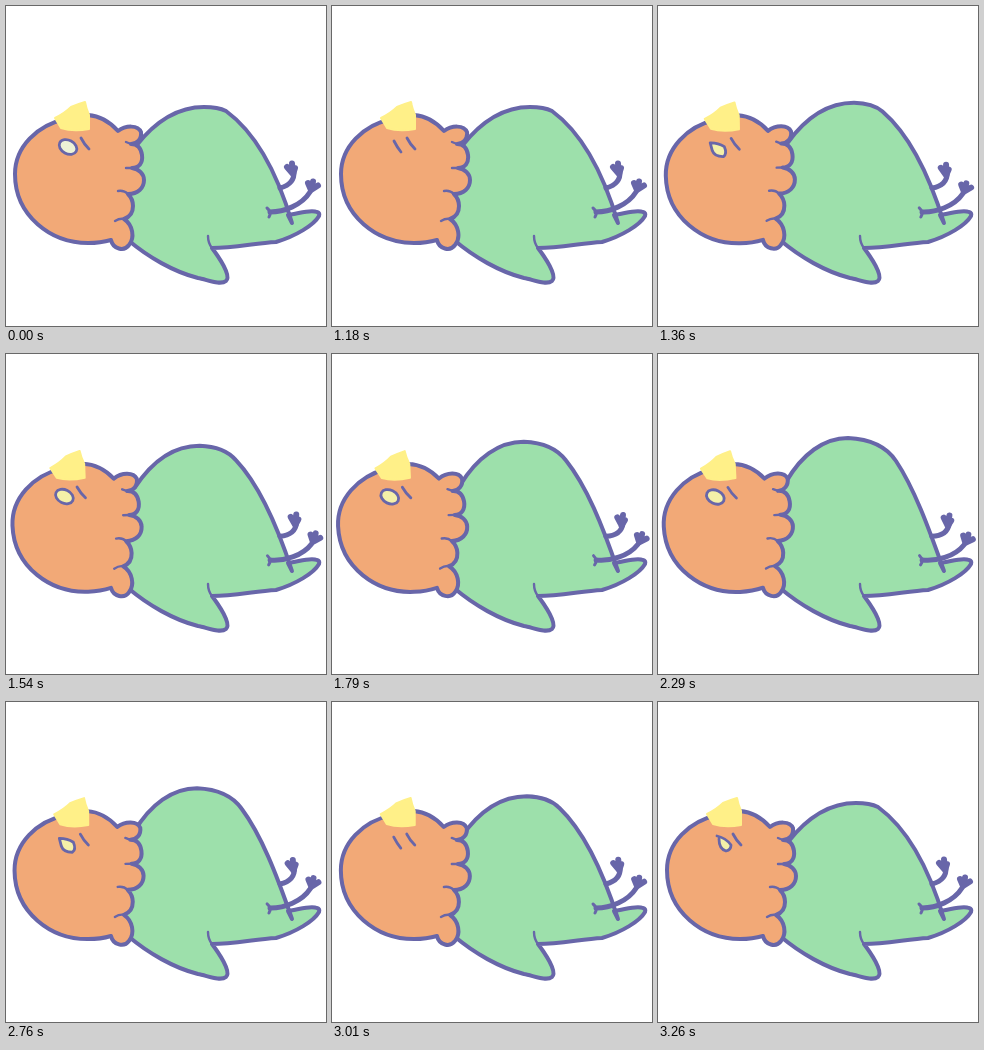
Animation, 320 px wide and 320 px high, one loop 3.44 s. Source, as an HTML page:

```html
<!DOCTYPE html>
<html>
<head>
<meta charset="utf-8">
<style>
html, body { margin: 0; width: 100%; height: 100%; overflow: hidden; background: #fff; }
svg { display: block; width: 100%; height: 100%; }
path, ellipse { stroke: #6866a9; stroke-width: 4; stroke-linecap: round; stroke-linejoin: round; fill: none; }
#body { fill: #9de0ab; }
#skull { fill: #f2a977; }
#beak { fill: #fff088; stroke: #fff088; stroke-width: 2; }
.leg { stroke-width: 5; }
.toes { stroke-width: 6; }
.crease { stroke-width: 2.4; }
.eye, #brow { stroke-width: 2.8; }
.eye { fill: #f4f0a8; }
#closed { fill: none; }
</style>
</head>
<body>
<svg viewBox="0 0 320 320">
  <path id="body"/>
  <path class="crease" d="M202 230Q202 237 206 242"/>
  <g id="upperFoot">
    <path class="leg" d="M274 182Q289 178 288 165"/>
    <path class="toes" d="M281 161L287 168L286 157.500M287 168L289 162"/>
  </g>
  <g id="lowerFoot">
    <path class="leg" d="M264 206C278 206 296 199 304 186"/>
    <path class="toes" d="M302 177L305 184L307 175.500M305 184L312 179.500"/>
    <path d="M261 202Q266 206 263 211" style="stroke-width:3"/>
  </g>
  <g id="head">
    <path id="skull" d="M60 113C31 119 9 141 9 168C9 210 45 237 82 237C92 237 98 236 105 234
      C107 243 118 246 123 239C129 232 127 219 118 213C124 211 127 206 127 200
      C127 194 125 191 122 188C132 188 138 182 138 174C138 168 133 163 126 162
      C133 162 137 157 136 149C135 142 131 138 125 138C131 138 136 133 135 126
      C132 119 120 119 112 125C104 116 95 110 82 109Q70 107 60 113Z"/>
    <path class="crease" d="M120 136L125 138M120 162H126M112 185Q118 184 122 188M109 215Q114 212 118 213"/>
    <path id="beak" d="M49 112Q59 107 65 101Q72 98 79 96Q80 102 83 109L83 123Q67 126 55 122Z"/>
    <ellipse class="eye" id="open" cx="62" cy="141" rx="9.300" ry="6.700" transform="rotate(28 62 141)"/>
    <path class="eye" id="half" d="M54 136Q62 136 68 140Q71 147 67 150Q58 150 56 144Z"/>
    <path class="eye" id="sliver" d="M59 134Q68 136 73 143Q73 148 68 149Q61 147 61 137"/>
    <path class="eye" id="closed" d="M62 135Q65 141 69 146"/>
    <path id="brow" d="M75 132Q78 138 83 143"/>
  </g>
</svg>
<script>
const LOOP = 3440;
// start time, chest inflation, head tilt, eye
const poses = [
  [0, 0, 0, 'open'],
  [1180, 0, 0, 'closed'],
  [1360, .25, .4, 'half'],
  [1540, .55, .85, 'open'],
  [1720, .72, 1, 'open'],
  [1790, .78, 1, 'open'],
  [1860, .84, 1, 'open'],
  [1930, .9, 1, 'open'],
  [2110, .95, 1.05, 'open'],
  [2290, 1, 1.1, 'open'],
  [2760, .87, .15, 'half'],
  [2940, .65, .1, 'closed'],
  [3010, .4, .05, 'closed'],
  [3080, .12, 0, 'closed'],
  [3260, 0, 0, 'sliver']
];
const flatBack = [130, 140, 148, 117, 170, 101, 198, 101, 208, 101, 214, 102, 220, 105, 250, 127, 271, 166];
const fullBack = [128, 128, 144, 100, 166, 84, 190, 84, 212, 85, 228, 92, 238, 107, 256, 134, 270, 172];
// The last points lie hidden behind the head.
const underside = ' 286 217L282 209C292 208 304 203 311 206Q314 207 313 210C308 219 290 230 270 236' +
  'C250 237 228 242 206 242C212 250 226 270 220 275' +
  'C214 280 200 273 192 272C168 266 142 251 122 234L112 220V150';
const el = id => document.getElementById(id);
const eyes = ['open', 'half', 'sliver', 'closed'];

function turn(id, degrees, x, y) {
  el(id).setAttribute('transform', `rotate(${degrees} ${x} ${y})`);
}

function draw(now) {
  const t = now % LOOP;
  const [start, chest, tilt, eye] = poses.findLast(pose => pose[0] <= t);
  const [x, y, ...curve] = flatBack.map((v, i) => v + (fullBack[i] - v) * chest);
  el('body').setAttribute('d', `M${x} ${y}C${curve.join(' ')}${underside}`);
  turn('head', -2.6 * tilt, 100, 235);
  turn('upperFoot', 13 * tilt, 273, 181);
  turn('lowerFoot', 6 * tilt, 264, 207);
  for (const id of eyes) el(id).style.display = id === eye ? '' : 'none';
  el('open').style.fill = start === 0 ? '#eef3d6' : '';
  requestAnimationFrame(() => draw(performance.now()));
}
draw(0);
</script>
</body>
</html>
```
